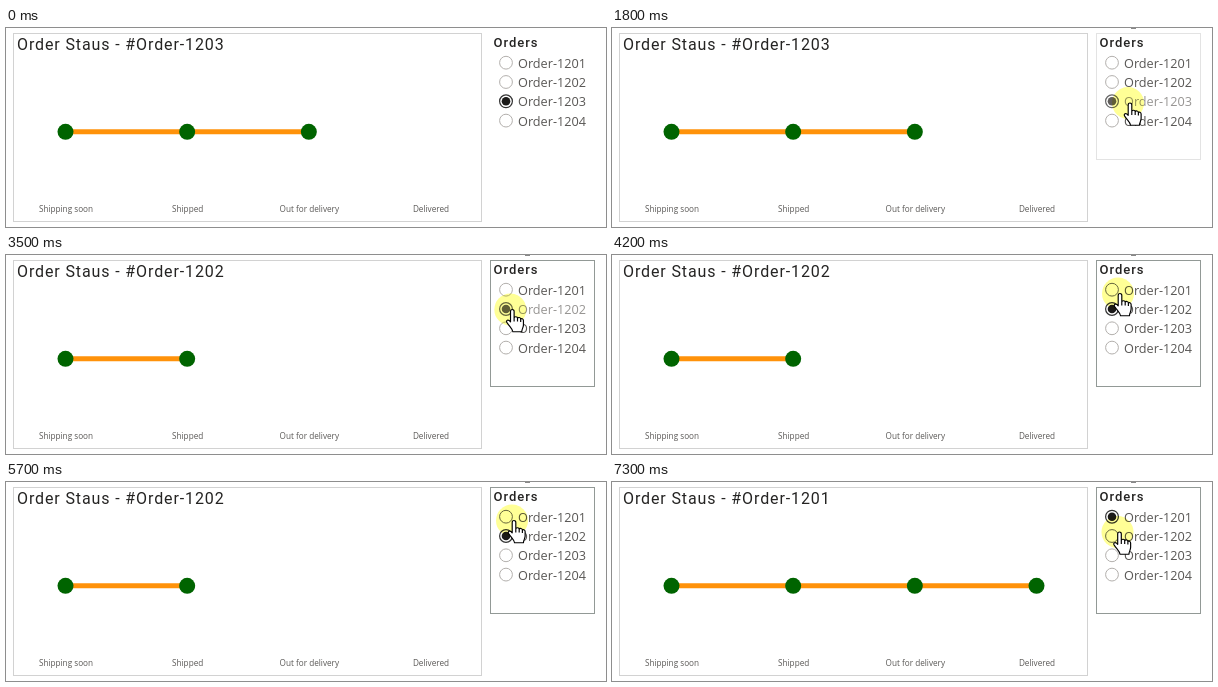
Write an HTML page that moves like this. It is 600 by 199 pixels and loops after 8000 ms.

```html
<!DOCTYPE html>
<html lang="en">
<head>
<meta charset="utf-8">
<title>Order status</title>
<style>
  html, body { margin: 0; width: 100%; height: 100%; overflow: hidden; background: #fff; }
  svg { display: block; width: 600px; height: 199px; }
  .head { font-family: Roboto, sans-serif; fill: #252423; }
  .title { font-size: 16px; letter-spacing: .88px; }
  .orders { font-size: 13px; font-weight: 500; letter-spacing: 1px; }
  .option, .axis { font-family: "Open Sans", "Noto Sans", sans-serif; fill: #5a5856; }
  .option { font-size: 12.7px; }
  .axis { font-size: 8.2px; text-anchor: middle; }
  .halo { fill: #ffff96; mix-blend-mode: multiply; }
  .pointer { fill: #fff; stroke: #000; stroke-width: 1.1; stroke-linejoin: round; }
</style>
</head>
<body>
<svg id="stage" viewBox="0 0 600 199">
  <rect width="600" height="199" fill="#fff"/>
  <rect x="7.5" y="5.5" width="468" height="188" fill="none" stroke="#d2d2d2"/>
  <text id="title" class="head title" x="11" y="22"></text>
  <line id="track" x1="59.5" y1="103.8" y2="103.8" stroke="#ff920a" stroke-width="5"/>
  <g id="stops"></g>
  <g id="panel">
    <rect id="border" x="484.5" y="5.5" width="104" height="126" fill="none"/>
    <path d="M519 .5h5" stroke="#888"/>
  </g>
  <text class="head orders" x="487.5" y="18.5">Orders</text>
  <g id="options"></g>
  <circle id="halo" class="halo" r="16"/>
  <path id="arrow" class="pointer" d="M0 0V16L3.8 12.5L6.4 18.5L9 17.3L6.4 11.5H11.5Z"/>
  <path id="hand" class="pointer" d="M0 1.8C0-.6 3.4-.6 3.4 1.8V8C3.7 6.3 6.6 6.5 6.6 8.3C7.1 7 9.6 7.3 9.6 9.1C10.2 8.1 12.2 8.6 12.2 10.4V14.5C12.2 17 10.8 18 10.6 21H2.2C2 18.3-.6 16.4-3.3 12.4C-4.7 10.2-2.2 8.9 0 11.6ZM3.4 8V11.3M6.6 8.5V11.3M9.6 9.3V11.7"/>
</svg>
<script>
const LOOP = 8000, STEP = 100;
const $ = id => document.getElementById(id);
const set = (node, attrs) => {
  for (const key in attrs) node.setAttribute(key, attrs[key]);
  return node;
};
const add = (parent, tag, attrs, text = "") => {
  const node = set(document.createElementNS("http://www.w3.org/2000/svg", tag), attrs);
  node.textContent = text;
  return parent.appendChild(node);
};
const show = (node, visible) => { node.style.display = visible ? "" : "none"; };

const stopX = i => 59.5 + 121.67 * i;
const dots = ["Shipping soon", "Shipped", "Out for delivery", "Delivered"].map((label, i) => {
  add($("stops"), "text", { class: "axis", x: stopX(i) + .5, y: 184.3 }, label);
  return add($("stops"), "circle", { cx: stopX(i), cy: 103.8, r: 8, fill: "#006400" });
});

const rowY = i => 35 + 19.3 * i;
const options = [1201, 1202, 1203, 1204].map((number, i) => ({
  ring: add($("options"), "circle", { cx: 500, cy: rowY(i) - .3, r: 6.4, fill: "#fff" }),
  dot: add($("options"), "circle", { cx: 500, cy: rowY(i) - .3, r: 4.3 }),
  label: add($("options"), "text", { class: "option", x: 512, y: rowY(i) + 4.7 }, "Order-" + number)
}));
const reached = [4, 2, 3, 1];

// Pointer stops: time, x, y
const route = [
  [1200, 581, 151.5], [1400, 548, 114], [1500, 548, 114], [1800, 516, 75],
  [2400, 516, 75], [2600, 504, 57.5], [3400, 504, 57.5], [3800, 506, 38.5],
  [6100, 506, 38.5], [6400, 505.5, 50]
];

function pointerAt(time) {
  const next = route.findIndex(p => p[0] > time);
  if (next === 0) return null;
  if (next < 0) return route[route.length - 1].slice(1);
  const [t0, x0, y0] = route[next - 1], [t1, x1, y1] = route[next];
  const k = (time - t0) / (t1 - t0), ease = k * k * (3 - 2 * k);
  return [x0 + (x1 - x0) * ease, y0 + (y1 - y0) * ease];
}

const orderAt = (time, first, second) => time < first ? 2 : time < second ? 1 : 0;

function draw(time) {
  const picked = orderAt(time, 3200, 5900);
  const charted = orderAt(time, 3400, 6100);
  const pointer = pointerAt(time);
  const inside = pointer && pointer[1] < 131;
  const hover = inside && pointer[1] < 103 ? Math.round((pointer[1] - 35) / 19.3) : -1;

  $("title").textContent = "Order Staus - #Order-" + (1201 + charted);
  set($("track"), { x2: stopX(reached[charted] - 1) });
  dots.forEach((dot, i) => show(dot, i < reached[charted]));

  options.forEach(({ ring, dot, label }, i) => {
    const on = i === picked, over = i === hover;
    set(ring, { stroke: over ? "#666" : on ? "#333" : "#b3b0ad", "stroke-width": on ? 1.2 : 1 });
    set(dot, { fill: on && over ? "#605e5c" : "#1b1a19" });
    show(dot, on);
    label.style.fill = on && over ? "#979593" : "";
  });

  show($("panel"), inside);
  set($("border"), { stroke: time < 3200 ? "#e3e3e3" : "#929996" });

  show($("halo"), pointer);
  show($("arrow"), pointer && hover < 0);
  show($("hand"), hover >= 0);
  if (!pointer) return;
  const [x, y] = pointer;
  set($("halo"), { cx: x, cy: y });
  set($("arrow"), { transform: `translate(${x + 1.5} ${y})` });
  set($("hand"), { transform: `translate(${x + .2} ${y}) scale(1.06)` });
}

const start = performance.now();
function tick() {
  const time = (performance.now() - start) % LOOP;
  draw(Math.floor(time / STEP) * STEP);
  requestAnimationFrame(tick);
}
tick();
</script>
</body>
</html>
```
